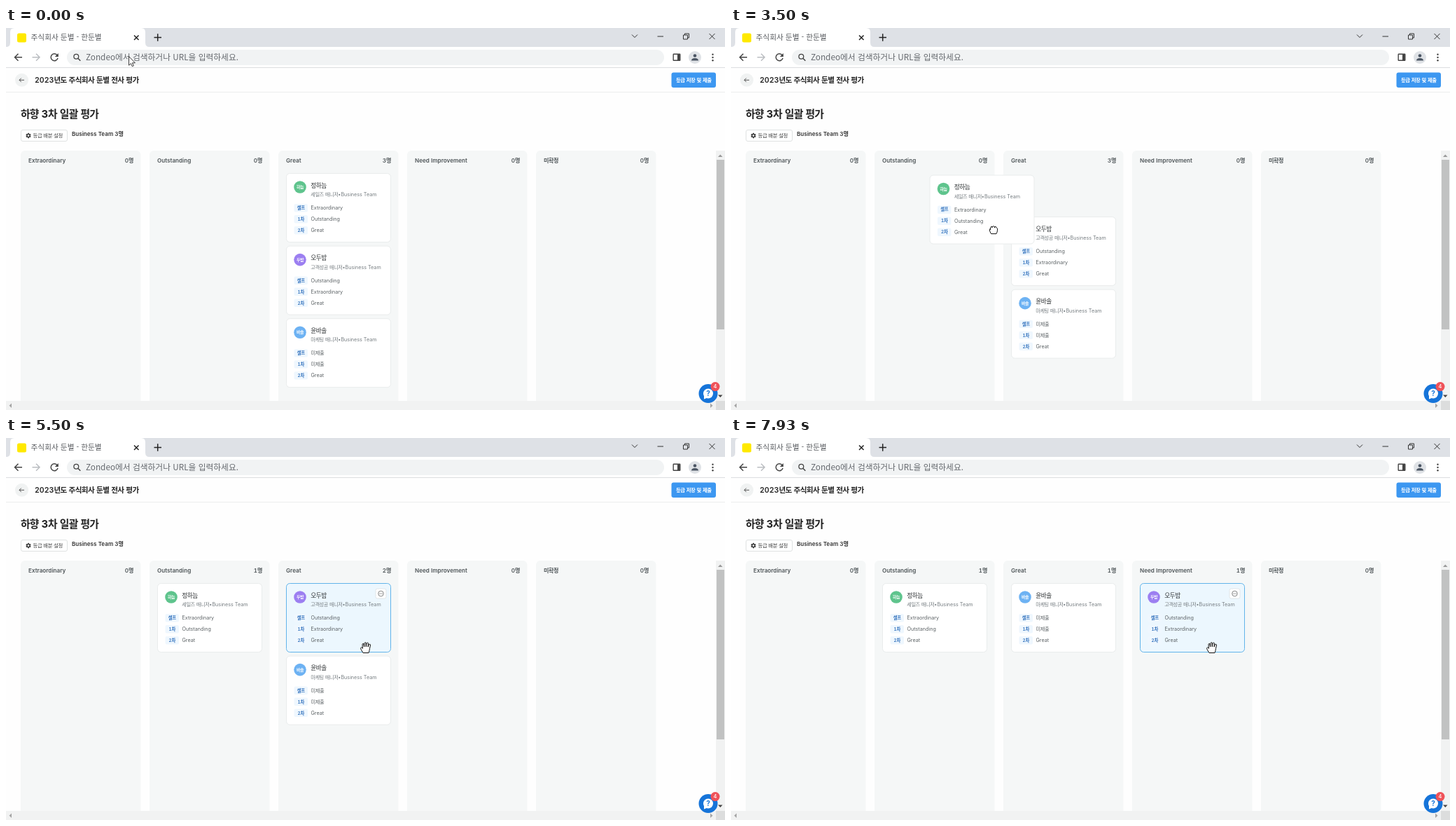
An HTML page that plays this animation: 1027x545 px, repeating every 8 s.

```html
<!DOCTYPE html>
<html lang="ko">
<head>
<meta charset="utf-8">
<title>평가 보드</title>
<style>
  html, body { margin: 0; width: 100%; height: 100%; overflow: hidden; background: #fefefe; }
  svg { display: block; width: 100%; height: 100%; }
  text { font-family: Inter, "Noto Sans CJK KR", "Noto Sans CJK", sans-serif; font-variant-numeric: tabular-nums; white-space: pre; }
  .chrome { font-family: "Noto Sans CJK KR", "Noto Sans CJK", sans-serif; }
  .ko { letter-spacing: -.057em; }
  .line { fill: none; stroke: #444; stroke-width: 1.2; }
  .card > .face { fill: #fff; stroke: #e9ecec; }
  .card > .comment { display: none; }
  .card.hover > .face { fill: #ecf7fe; stroke: #62b4ea; }
  .card.hover > .comment { display: inline; }
  .cursor { fill: #fff; stroke: #111; stroke-linejoin: round; }
</style>
</head>
<body>
<svg id="stage" viewBox="0 0 1027 545"></svg>
<script>
const LOOP = 8000, FPS = 14;
const CARD_W = 149, CARD_H = 98, PITCH = 103.6, TOP = 207.5;
const columnX = i => 21 + 184 * i;
const slotX = i => columnX(i) + 11.5;

// ---------- drawing helpers ----------
const rect = (x, y, w, h, fill, r = 0, extra = '') =>
  `<rect x="${x}" y="${y}" width="${w}" height="${h}" rx="${r}" fill="${fill}" ${extra}/>`;
const circle = (x, y, r, fill, extra = '') => `<circle cx="${x}" cy="${y}" r="${r}" fill="${fill}" ${extra}/>`;
const line = (d, extra = '') => `<path class="line" d="${d}" ${extra}/>`;
const shape = (d, fill) => `<path d="${d}" fill="${fill}"/>`;
const tighten = s => s.replace(/[가-힣]+/g, '<tspan class="ko">$&</tspan>');
// y is the vertical middle of the glyphs
const text = (x, y, size, str, fill, weight = 400, extra = '') =>
  `<text x="${x}" y="${y + .36 * size}" font-size="${size}" fill="${fill}" font-weight="${weight}" ${extra}>${tighten(str)}</text>`;
const chromeText = (x, y, size, str, fill) =>
  `<text class="chrome" x="${x}" y="${y + .36 * size}" font-size="${size}" fill="${fill}">${str}</text>`;
const END = 'text-anchor="end"', MID = 'text-anchor="middle"';

function browser() {
  return rect(0, 0, 1027, 27, '#dee1e6') + rect(0, 27, 1027, 29.5, '#fff') +
    shape('M0 27Q6 27 6 21V6Q6 0 12 0H193Q199 0 199 6V21Q199 27 205 27Z', '#fff') +
    rect(16, 7.5, 13, 13, '#ffe900', 2.5) +
    chromeText(35.5, 13.3, 10.7, '주식회사 둔별 - 한둔별', '#56595d') +
    line('M183 10.5l6.5 6.5M189.5 10.5l-6.5 6.5M211.5 13.5h10.5M216.7 8.3v10.5', 'style="stroke:#222;stroke-width:1.5"') +
    line('M894 9.5l4 4 4-4M930.5 12h8.5M967.5 10h6v6h-6zM969.5 10v-2h6v6h-2M1004.5 8l8 8M1012.5 8l-8 8', 'style="stroke:#333;stroke-width:1"') +
    line('M23 41.8H12.5M17.5 36.8l-5 5 5 5', 'style="stroke-width:1.5"') +
    line('M37.5 41.8H48M43 36.8l5 5-5 5', 'style="stroke:#bbbec2;stroke-width:1.5"') +
    line('M73.2 38.8A5 5 0 1 0 74 42.8', 'style="stroke-width:1.5"') + shape('M74.8 36v5h-5z', '#444') +
    rect(87, 31, 853, 22, '#f1f3f4', 11) +
    line('M103 43.5l3.3 3.3', 'style="stroke-width:1.5"') + circle(100.3, 40.7, 3.4, 'none', 'stroke="#444" stroke-width="1.3"') +
    chromeText(114, 42, 11.75, 'Zondeo에서 검색하거나 URL을 입력하세요.', '#65696e') +
    rect(953.2, 37.2, 9.6, 9, 'none', .5, 'stroke="#444" stroke-width="1.4"') + rect(959, 37, 4, 9.5, '#444') +
    circle(984, 42, 9, '#dfe2e6') + circle(984, 39.5, 2.3, '#4b5563') + shape('M979 46.6Q979 43 984 43T989 46.6Z', '#4b5563') +
    [37.8, 42, 46.2].map(y => circle(1009.5, y, 1.2, '#444')).join('') +
    rect(0, 56, 1027, 1, '#dcdee0');
}

function pageHeader() {
  const teeth = [0, 60, 120].map(a => rect(31, 149.8, 2, 7.4, '#444', .5, `transform="rotate(${a} 32 153.5)"`)).join('');
  return rect(0, 91, 1027, 1, '#eceeee') +
    circle(22.5, 74.3, 9.5, '#f0f2f2') + line('M26 74.3h-7M21.8 71.5l-2.8 2.8 2.8 2.8', 'style="stroke-width:.9"') +
    text(41, 74.3, 10.6, '2023년도 주식회사 둔별 전사 평가', '#222', 600) +
    rect(950.5, 63.5, 63.5, 21.5, '#3c97f1', 3) +
    text(982.3, 74.3, 7.4, '등급 저장 및 제출', '#fff', 700, MID) +
    text(21, 122.3, 14.8, '하향 3차 일괄 평가', '#222', 700) +
    rect(21.5, 145.5, 66, 16, '#fff', 2.5, 'stroke="#dfe2e2"') +
    teeth + circle(32, 153.5, 2.8, '#444') + circle(32, 153.5, 1.2, '#fff') +
    text(38.5, 153.5, 7.4, '등급 배분 설정', '#444') +
    text(94, 151, 8.1, 'Business Team 3명', '#333', 600);
}

function columns() {
  return ['Extraordinary', 'Outstanding', 'Great', 'Need Improvement', '미확정'].map((name, i) =>
    rect(columnX(i), 175, 171.5, 380, '#f5f7f7', 6) +
    text(columnX(i) + 11, 189.3, 8.15, name, '#4f5659', 600) +
    text(columnX(i) + 161, 189.3, 8.15, '', '#4f5659', 600, END + ' class="count"')).join('');
}

function cardMarkup({ name, role, color, grades }) {
  const rows = ['셀프', '1차', '2차'].map((label, i) => {
    const y = 49.2 + 16 * i;
    return rect(11, y - 5.7, 19.5, 11.4, '#eff7fe', 2) +
      text(20.8, y, 6.3, label, '#3272bd', 600, MID) + text(35, y, 7.2, grades[i], '#5c6265');
  }).join('');
  const dots = [-1.8, 0, 1.8].map(d => circle(135 + d, 14.5, .6, '#555')).join('');
  return `<g class="card">` +
    rect(0, 0, CARD_W, CARD_H, '#fff', 5, 'class="face"') +
    circle(19.5, 19.5, 8.8, color) + text(19.6, 19.5, 6, name.slice(1), '#fff', 700, MID) +
    text(34.7, 17, 8.7, name, '#2d3133', 500) +
    text(34.7, 30, 7.2, role + ' 매니저•Business Team', '#777e82') + rows +
    `<g class="comment">${rect(127.5, 7.5, 15, 14, '#fff', 2.5, 'stroke="#e1e6e9"')}` +
    circle(135, 14.5, 3.8, 'none', 'stroke="#666" stroke-width=".8"') + dots + '</g></g>';
}

function overlay() {
  return rect(1014, 175, 13, 357, '#f1f2f2') + rect(1015, 188, 11, 242, '#c1c2c2') +
    shape('M1017 184h6.5l-3.2-3.5z', '#999') + shape('M1017 523.5h6.5l-3.2 3.5z', '#444') +
    rect(0, 532, 1027, 13, '#f1f2f2') + rect(1014, 532, 13, 13, '#dcdddd') +
    shape('M8 535.5v6.5l-3.5-3.2z', '#a5a5a5') + shape('M1006 535.5v6.5l3.5-3.2z', '#a5a5a5') +
    circle(1003, 521.5, 13.5, '#1674d9') + circle(1003, 521.5, 7, '#fff') + shape('M997 524v5.5l5-2z', '#fff') +
    text(1003, 521.7, 10, '?', '#1674d9', 700, MID) +
    circle(1013, 511.6, 6.5, '#ef5259') + text(1013, 511.6, 7.5, '4', '#fff', 500, MID);
}

const cursorShapes = {
  arrow: 'M.5 .5V13.2L3.4 10.6L5.3 14.8L7.3 13.9L5.4 9.8H9.4Z',
  hand: 'M-4 7.5L-7 2.5Q-8 0-6.3-.5L-4.5 1.2L-5-4.5Q-4.8-6-3.4-5.6L-2.4-1L-2-6.5Q-1.3-8 0-7L.2-1.2L1.3-6.5Q2.5-7.7 3.5-6.3L3-1L4.6-4.7Q6-5.3 6.6-4L5.5 1.5Q5 5 4 7.5Z',
  fist: 'M-3.5 5.6L-5.2 2.2Q-6.6-.8-4.4-2.2Q-4.4-5.3-2-4.3Q-.2-6.4 1.5-4.3Q4-5.4 4.3-2.9Q6.2-2.6 5.6 .2Q5.3 3.5 4 5.6ZM-2-4.3V-2.8M1.5-4.3V-2.8M-4.4-2.2V0'
};

const people = [
  { name: '정하늠', role: '세일즈', color: '#5fc48d', grades: ['Extraordinary', 'Outstanding', 'Great'] },
  { name: '오두밤', role: '고객성공', color: '#9c7ff1', grades: ['Outstanding', 'Extraordinary', 'Great'] },
  { name: '윤바솔', role: '마케팅', color: '#6db2f3', grades: ['미제출', '미제출', 'Great'] }
];

const stage = document.getElementById('stage');
stage.innerHTML = rect(0, 0, 1027, 545, '#fefefe') + columns() + browser() + pageHeader() +
  people.slice().reverse().map(cardMarkup).join('') + overlay() + '<path class="cursor"/>';
const cards = [...stage.querySelectorAll('.card')].reverse();
const counts = [...stage.querySelectorAll('.count')];
const cursor = stage.querySelector('.cursor');

// ---------- motion ----------
const clamp = v => Math.min(1, Math.max(0, v));
const mix = (a, b, k) => a + (b - a) * k;

function bezier(x1, y1, x2, y2) {
  const at = (a, b, s) => 3 * a * s * (1 - s) ** 2 + 3 * b * s * s * (1 - s) + s ** 3;
  return x => {
    let lo = 0, hi = 1;
    for (let i = 0; i < 20; i++) {
      const s = (lo + hi) / 2;
      if (at(x1, x2, s) < x) lo = s; else hi = s;
    }
    return at(y1, y2, hi);
  };
}
const makeWay = bezier(.2, 0, 0, 1), settle = bezier(.2, 1, .1, 1);

// time, x, y, eased
const cursorPath = [
  [0, 175, 40], [643, 175, 40], [1428, 328, 116, true], [1643, 328, 116], [1714, 329, 116],
  [1857, 329, 116], [2571, 492, 285, true], [3000, 492, 285], [3214, 468, 286], [3429, 407, 288],
  [3500, 375, 288], [3643, 354, 286], [3786, 349, 285], [3929, 349, 285], [4214, 345, 284],
  [4571, 345, 284], [4786, 430, 290], [5000, 480, 296], [5500, 514, 299], [5929, 514, 299],
  [6000, 523, 299], [6214, 565, 300], [6332, 607, 300], [6429, 651.5, 300], [6571, 668, 300],
  [6786, 676, 300], [7000, 687, 299], [LOOP, 687, 299]
];

function cursorAt(t) {
  const i = Math.max(1, cursorPath.findIndex(p => p[0] >= t));
  const [t0, x0, y0] = cursorPath[i - 1], [t1, x1, y1, eased] = cursorPath[i];
  let k = clamp((t - t0) / (t1 - t0));
  if (eased) k = k * k * (3 - 2 * k);
  return [mix(x0, x1, k), mix(y0, y1, k)];
}

const drags = [
  { card: 0, from: 2, to: 1, grab: 3070, leave: 3467, drop: 4210, done: 4640, grip: [91, 78] },
  { card: 1, from: 2, to: 3, grab: 5995, leave: 6330, drop: 7425, done: 7855, grip: [122.5, 93] }
];

function cardPositions(t) {
  const places = people.map((_, i) => [slotX(2), TOP + PITCH * i]);
  for (const { card, to, grab, leave, drop, grip } of drags) {
    if (t < grab) continue;
    const held = cursorAt(Math.min(t, drop)).map((v, axis) => v - grip[axis]);
    const k = settle(clamp((t - drop) / 340));
    places[card] = [mix(held[0], slotX(to), k), mix(held[1], TOP, k)];
    const shift = PITCH * makeWay(clamp((t - leave) / 200));
    for (let i = card + 1; i < places.length; i++) places[i][1] -= shift;
  }
  return places;
}

function render(t) {
  const [x, y] = cursorAt(t);
  const active = drags.find(d => t >= d.grab && t < d.done);
  const totals = [0, 0, people.length, 0, 0];
  for (const d of drags) if (t >= d.done) { totals[d.from]--; totals[d.to]++; }
  counts.forEach((node, i) => { node.innerHTML = tighten(totals[i] + '명'); });

  let hovered = false;
  cardPositions(t).forEach(([cx, cy], i) => {
    const over = !active && x >= cx && x <= cx + CARD_W && y >= cy && y <= cy + CARD_H;
    hovered = hovered || over;
    cards[i].setAttribute('transform', `translate(${cx} ${cy})`);
    cards[i].classList.toggle('hover', over);
  });

  const kind = active && t < active.drop ? 'fist' : hovered ? 'hand' : 'arrow';
  cursor.setAttribute('d', cursorShapes[kind]);
  cursor.setAttribute('transform', `translate(${x} ${y})`);
  cursor.setAttribute('stroke-width', kind === 'arrow' ? .8 : 1);
}

const start = performance.now();
function tick() {
  const t = (performance.now() - start) % LOOP;
  render(Math.floor((t + 5) * FPS / 1000) * 1000 / FPS % LOOP);
  requestAnimationFrame(tick);
}
tick();
</script>
</body>
</html>
```
